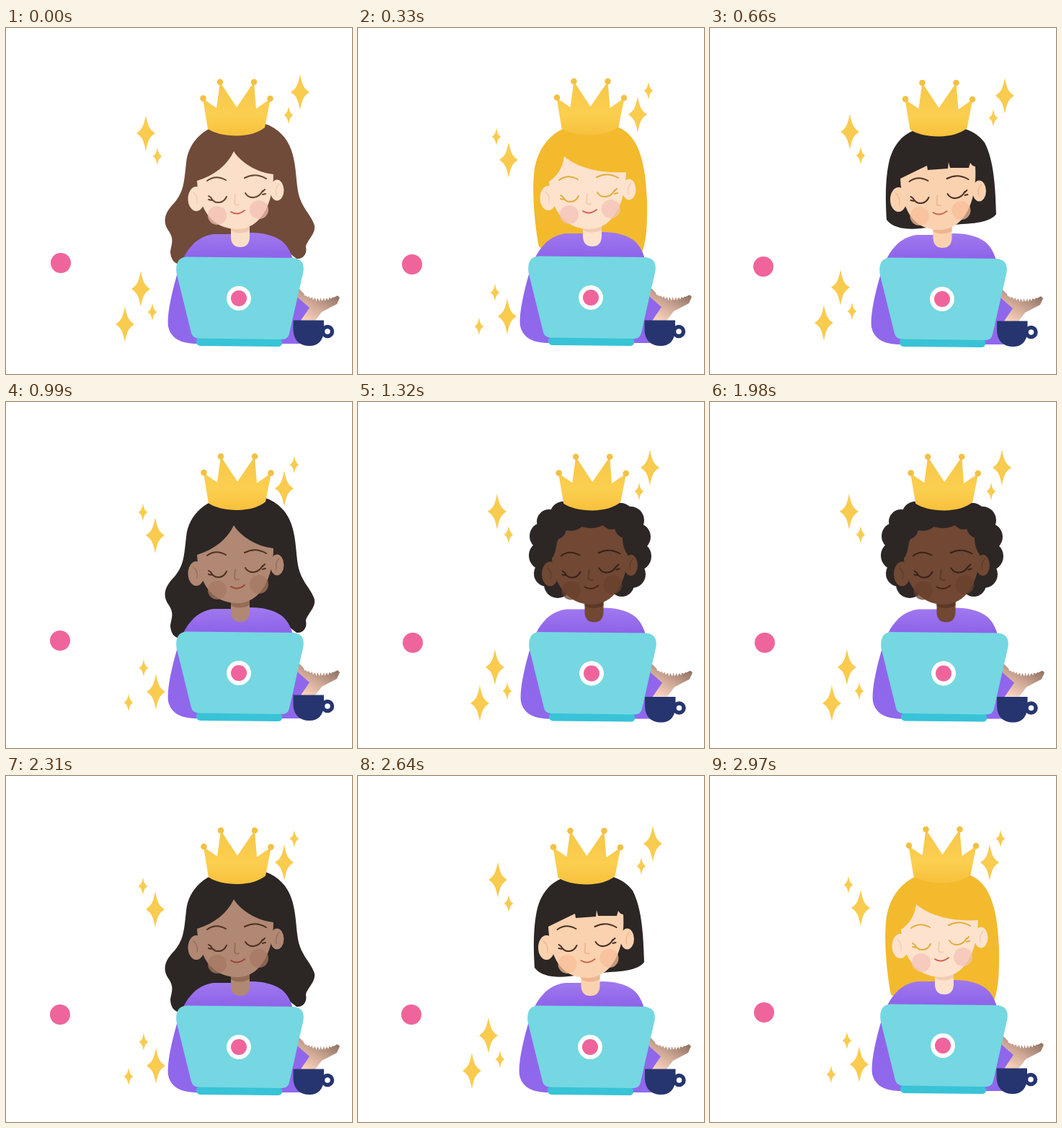
These frames come from a looping animation (480x480 px, 3.3 s). An HTML page:

```html
<!DOCTYPE html>
<html lang="en">
<head>
<meta charset="utf-8">
<title>Coding Queen</title>
<style>
html, body { margin: 0; width: 100%; height: 100%; overflow: hidden; background: #fff; }
svg { display: block; width: 100vw; height: 100vh; }
text { font-family: Lato, sans-serif; font-size: 50px; letter-spacing: 3px; fill: #fcfcfc; }
text.small { font-size: 20px; letter-spacing: 1px; fill: #fefefe; }
.line { fill: none; stroke-linecap: round; stroke-linejoin: round; }
.scene { visibility: hidden; animation: 3300ms step-end infinite; }
/* The six portraits run forwards, then backwards. */
@keyframes p0 { 0% { visibility: visible } 10%, 100% { visibility: hidden } }
@keyframes p1 { 0%, 20% { visibility: hidden } 10%, 90% { visibility: visible } 100% { visibility: hidden } }
@keyframes p2 { 0%, 30%, 90% { visibility: hidden } 20%, 80% { visibility: visible } 100% { visibility: hidden } }
@keyframes p3 { 0%, 40%, 80% { visibility: hidden } 30%, 70% { visibility: visible } 100% { visibility: hidden } }
@keyframes p4 { 0%, 50%, 70% { visibility: hidden } 40%, 60% { visibility: visible } 100% { visibility: hidden } }
@keyframes p5 { 0%, 60% { visibility: hidden } 50% { visibility: visible } 100% { visibility: hidden } }
</style>
</head>
<body>
<svg id="stage" viewBox="0 0 480 480">
  <defs>
    <linearGradient id="gold" x2="0" y2="1">
      <stop offset="0" stop-color="#f6c748"/><stop offset=".6" stop-color="#fccf50"/><stop offset="1" stop-color="#f7c13c"/>
    </linearGradient>
    <linearGradient id="purple" x2="0" y2="1">
      <stop offset="0" stop-color="#a079ee"/><stop offset=".2" stop-color="#8f65ea"/><stop offset="1" stop-color="#9068ec"/>
    </linearGradient>
    <linearGradient id="fade" x1="0" y1="1" x2=".75" y2="0">
      <stop offset=".15" stop-color="#f6d0bb"/><stop offset=".5" stop-color="#d0a896"/><stop offset="1" stop-color="#84695c"/>
    </linearGradient>
    <radialGradient id="veil" gradientUnits="userSpaceOnUse" cx="318" cy="228" r="90">
      <stop offset=".55" stop-color="#d0cfd3"/><stop offset=".75" stop-color="#e4e3e7"/><stop offset="1" stop-color="#f4f4f6"/>
    </radialGradient>
    <path id="star" d="M0-25C3-10 5-5 13 0C5 5 3 10 0 25C-3 10-5 5-13 0C-5-5-3-10 0-25Z" fill="#f9cb4f"/>
    <g id="crown" fill="url(#gold)">
      <path d="M280 140L273 98L292 111L297 75L320 110L344 75L347 112L367 98L359 138Q345 149 320 149.500Q294 149 280 140Z"/>
      <g fill="#f3c043">
        <circle cx="273.500" cy="97.500" r="4.300"/><circle cx="297" cy="75" r="4.300"/>
        <circle cx="344" cy="75" r="4.300"/><circle cx="366.500" cy="98" r="4.300"/>
      </g>
    </g>
    <path id="body" fill="url(#purple)" d="M312 286H288C263 289 249 309 240 333C231 362 223 396 225 414C229 432 244 438 266 438H408L404 413L421 388L405 374L397 318C390 296 375 285 340 284Z"/>
    <g id="laptop">
      <path fill="#38c3d7" d="M269 430L378 431Q384 432 383 437Q383 442 377 442L269 441Q264 440 264 435Q264 430 269 430Z"/>
      <path fill="#75d7e1" d="M250 317.500L399 319Q415 321 412.500 338L393 424Q391 432.500 382 432L266 430.500Q259 430 257 423L236.500 340Q234 319 250 317.500Z"/>
      <circle cx="323" cy="375" r="17" fill="#fff"/>
      <circle cx="323" cy="375" r="11" fill="#f0649c"/>
    </g>
    <g id="cup" fill="#26356f">
      <path d="M398.500 405.500H441V420C440 434 433 441 421 441C407 441 399 433 398.500 419Z"/>
      <circle cx="446" cy="421" r="6.500" fill="none" stroke="#26356f" stroke-width="5.500"/>
    </g>
  </defs>
</svg>
<script>
const black = '#2c2625';
const wavy = 'M318 129C277 133 253 157 250 187C247 213 247 226 234 242C219 257 217 269 226 282C234 294 229 301 228 311C229 323 235 327 241 328L262 306H385L403 320C414 321 418 311 416 304C416 296 430 286 428 274C423 258 409 249 405 226C400 193 404 154 365 135C350 129 332 128 318 129Z';
const partedFace = 'M316 171C307 190 290 204 265 212C267 247 283 279 321 279C353 279 371 244 371 203C348 200 327 188 316 171Z';
const curls = [
  [265, 166, 17], [285, 157, 19], [324, 161, 27], [364, 159, 19], [378, 164, 19],
  [257, 186, 19], [257, 213, 20], [262, 238, 18], [277, 253, 19],
  [387, 187, 19], [387, 214, 20], [380, 239, 19], [366, 253, 17], [322, 205, 65]
];

const path = (d, fill) => `<path d="${d}" fill="${fill}"/>`;
const line = (d, color, width = 2) => `<path class="line" d="${d}" stroke="${color}" stroke-width="${width}"/>`;
const disc = (x, y, r, fill, extra = '') => `<circle cx="${x}" cy="${y}" r="${r}" fill="${fill}" ${extra}/>`;
const oval = (x, y, rx, ry, fill) => `<ellipse cx="${x}" cy="${y}" rx="${rx}" ry="${ry}" fill="${fill}"/>`;
const at = ([x, y], inner) => `<g transform="translate(${x} ${y})">${inner}</g>`;
const use = id => `<use href="#${id}"/>`;
const star = (x, y, size) => `<use href="#star" transform="translate(${x} ${y}) scale(${size})"/>`;

// head, crown, body, cup: offsets from the first portrait
// big, small: x, y pairs of the stars
const looks = [
  { head: [0, 0], crown: [0, 0], body: [0, 0], cup: [0, 0], dot: [76, 326],
    big: [194, 146, 408, 89, 187, 362, 165, 411], small: [210, 178, 392, 121, 203, 394],
    skin: '#fbdfc9', cheek: '#f2bfb3', ink: '#6a4432', shade: '#f0c9ae', lips: '#d7604f',
    hair: path(wavy, '#704b3a'), face: partedFace },
  { head: [0, -1], crown: [2.5, -1], body: [0, -1], cup: [-1, 0], dot: [75, 328],
    big: [209, 183, 388, 120, 207, 400], small: [192, 151, 403, 87, 190, 367, 168, 414],
    skin: '#fde2cd', cheek: '#f3c1b5', ink: '#e3ae3f', shade: '#f2cbb0', lips: '#d7604f',
    hair: path('M320 132C277 132 248 160 244 203C241 235 247 285 251 303L262 312H394C402 290 401 262 401 240C399 190 391 151 362 138C348 131 333 131 320 132Z', '#f3ba2d'),
    face: 'M286 178C284 194 276 206 265 213C267 247 283 279 321 279C353 279 371 244 372 200C338 202 306 195 286 178Z' },
  { head: [-2.5, 1], crown: [-2.5, 1], body: [-1, 1], cup: [-.5, 1], dot: [74, 331],
    big: [194, 144, 409, 94, 181, 360, 158, 409], small: [209, 177, 393, 125, 197, 393],
    skin: '#fbd2af', cheek: '#f7bd98', ink: '#4a3026', shade: '#eeb58f', lips: '#cf6550',
    hair: path('M318 136C280 136 258 151 249 183C242 212 244 246 245 266C254 278 273 280 292 278L349 272C375 271 391 267 397 258C396 222 394 184 381 159C368 141 346 135 318 136Z', black),
    face: 'M264 209Q280 201 301 191L302 197L330 195L331 186L333 194L359 194L361 187Q364 192 368 192C371 238 354 280 318 280C279 280 266 248 264 209Z' },
  { head: [0, 1], crown: [1, .5], body: [0, 1], cup: [0, 1], dot: [75, 331],
    big: [207, 185, 386, 120, 208, 402], small: [190, 153, 400, 87, 191, 369, 170, 417],
    skin: '#b08873', cheek: '#a57862', ink: '#4f3023', shade: '#956c57', lips: '#9c4638',
    hair: path(wavy, black), face: partedFace },
  { head: [2.5, 1.5], crown: [5.2, 1], body: [1, 1.5], cup: [-.5, 3.5], dot: [76, 334],
    big: [193, 152, 405, 91, 190, 368, 169, 418], small: [209, 184, 390, 124, 207, 401],
    skin: '#704833', cheek: '#68402d', ink: '#38231b', shade: '#5c3927', lips: '#4a241c',
    hair: curls.map(c => disc(...c, black)).join(''),
    face: 'M269 217C276 208 274 197 278 190Q286 188 289 178Q300 181 311 173Q325 178 340 171Q347 179 356 176Q359 186 367 188Q367 202 374 212C373 250 355 281 324 281C290 281 270 250 269 217Z' },
  { head: [-1, .5], crown: [0, 1], body: [-1, 1.5], cup: [-1.5, 2], dot: [75, 335],
    big: [206, 187, 384, 120, 209, 404], small: [188, 156, 398, 87, 192, 372, 171, 420],
    skin: '#b08873', cheek: '#a97d67', ink: '#543529', shade: '#986e59', lips: '#b04f45',
    veil: true,
    face: 'M267 240Q267 216 274 190C289 176 307 169 325 169C347 170 363 183 373 208Q375 226 373 240C366 245 359 255 353 264Q347 273 341 278V288Q325 291 309 288V281C289 277 275 261 267 240Z' }
];

function features(p) {
  const blush = 'opacity=".75"';
  return disc(293, 260, 13, p.cheek, blush) + disc(351, 252, 13, p.cheek, blush)
    + line('M279 212Q291 203 305 211M331 208Q346 200 361 209', p.ink)
    + line('M284 235Q288 243 296 242Q303 241 306 234M284 235L281 233M285 239L281 238', p.ink)
    + line('M332 229Q336 236 344 235Q352 234 356 226M356 227L359 224M356 231L360 230', p.ink)
    + line('M318 231L317 243Q319 247 323 245', p.shade, 1.7)
    + line('M312 255Q321 261 331 253', p.lips);
}

const neck = p => path('M312 268H338V291Q337 304 325 304Q313 304 312 291Z', p.skin)
  + path('M312 274Q326 282 338 273V281Q323 288 312 281Z', p.shade);

function portrait(p) {
  const ears = at(p.head, oval(264, 237, 11.5, 17, p.skin) + oval(376, 225, 9.5, 14.5, p.skin)
    + line('M260 228Q267 234 265 244M379 216Q373 222 375 232', p.shade, 1.2));
  return ears + path(p.face, p.skin) + at(p.head, features(p));
}

function veiled(p) {
  return path('M318 140C282 137 261 158 249 186C240 210 236 240 238 264C244 297 274 310 319 310C357 309 382 290 391 264C400 237 398 201 388 176C378 153 355 139 318 140Z', 'url(#veil)')
    + path('M320 158C293 160 270 190 268 224C266 265 286 289 320 290C353 289 373 263 375 225C374 184 353 157 320 158Z', black)
    + path(p.face, p.skin) + at(p.head, features(p))
    + path('M350 303Q346 311 341 321H368V299Z', '#f3f3f5');
}

// Ragged upper edge of the fading sleeve
function sleeve() {
  let d = 'M404 359L413 368';
  for (let i = 0; i < 32; i++) {
    const rough = Math.sin(i * 2.4) + Math.sin(i * 4.1);
    d += `L${414 + i * 1.5} ${371 + 1.5 * rough + 6 * Math.sin(i / 10)}`;
  }
  return path(d + 'L463 374L459 383L438 394L428 407H402Z', 'url(#fade)');
}

function sparkles(list, size) {
  let out = '';
  for (let i = 0; i < list.length; i += 2) out += star(list[i], list[i + 1], size);
  return out;
}

const title = '<text x="10" y="251">CODING</text><text x="29" y="307">QUEEN</text>'
  + '<text class="small" x="104" y="341">we code</text>';

function scene(p, i) {
  const torso = at(p.body, sleeve() + use('body'));
  const person = p.veil
    ? torso + veiled(p)
    : p.hair + torso + at(p.head, neck(p)) + portrait(p);
  return `<g class="scene" style="animation-name:p${i}">${p.veil ? title : ''}`
    + sparkles(p.big, 1) + sparkles(p.small, .49) + disc(...p.dot, 14, '#f0649c')
    + person + at(p.crown, use('crown')) + at(p.body, use('laptop')) + at(p.cup, use('cup')) + '</g>';
}

document.getElementById('stage').insertAdjacentHTML('beforeend', looks.map(scene).join(''));
</script>
</body>
</html>
```
